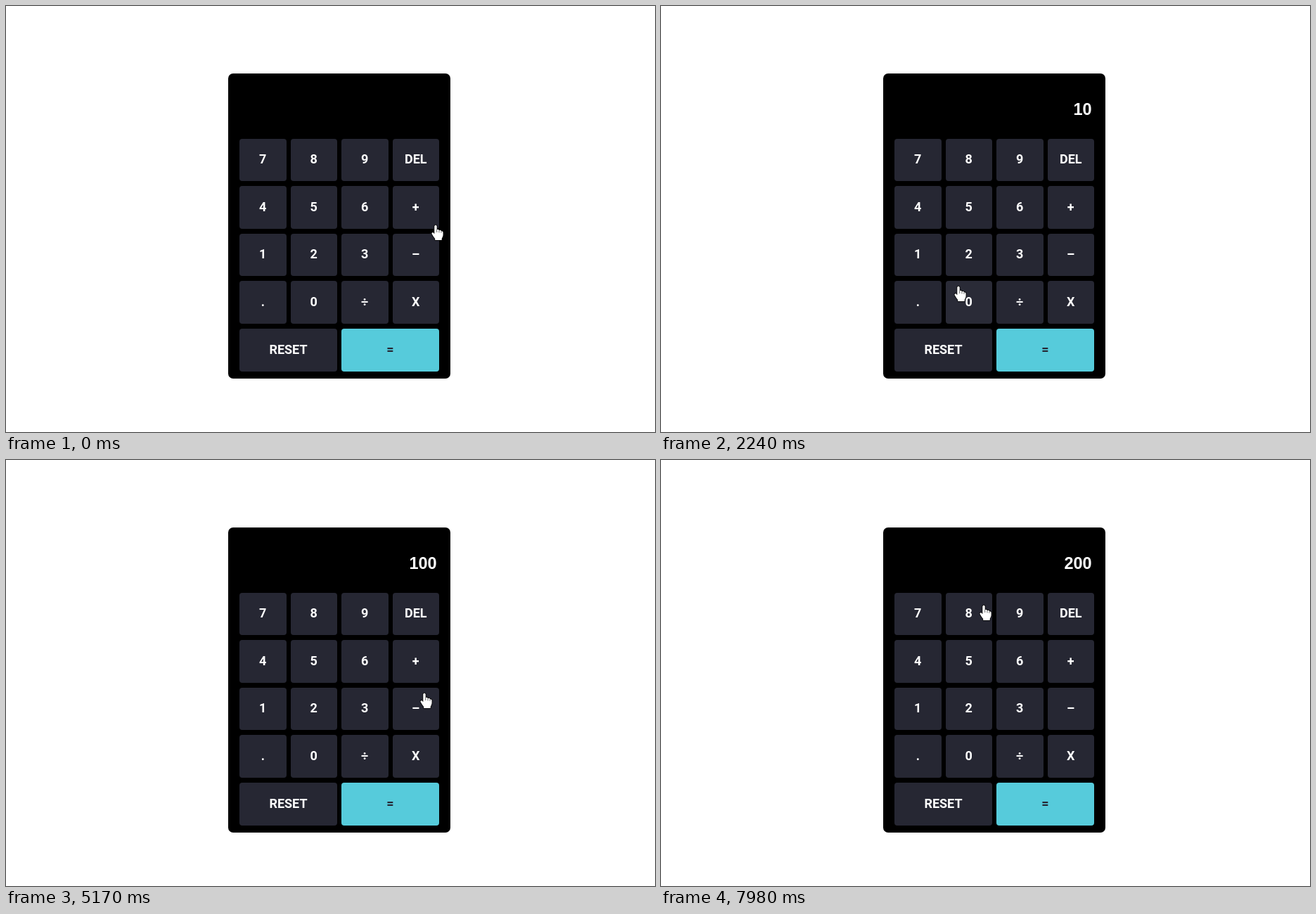
Write an HTML page that moves like this. It is 923x606 px and loops after 8000 ms.

```html
<!DOCTYPE html>
<html lang="en">
<head>
<meta charset="utf-8">
<title>Calculator</title>
<style>
  html, body { margin: 0; width: 100%; height: 100%; overflow: hidden; background: #fff; }
  svg { display: block; width: 923px; height: 606px; }
  .key { font: 700 18px Roboto, sans-serif; text-anchor: middle; fill: #fff; }
  .display { font: 700 23.5px "Liberation Sans", Arial, sans-serif; text-anchor: end; fill: #fff; }
</style>
</head>
<body>
<svg viewBox="0 0 923 606">
  <rect x="316" y="96" width="316" height="434" rx="7"/>
  <g id="keys"></g>
  <text id="display" class="display" x="612.6" y="155"></text>
  <g id="ripples"></g>
  <g id="cursor">
    <g id="hand" stroke="#000" stroke-linejoin="round">
      <path fill="#fff" stroke-width="1.6" paint-order="stroke"
        d="M-1.7 2Q0-1 1.7 2V7Q4.5 6 5 8.2Q7.4 7.2 8 9.2Q10.6 8.8 10.6 11V15Q10.4 17 8.7 20V22H-.8V20Q-3.4 17-5.2 13.6C-6.3 11.6-4.5 10.5-3.2 11.6L-1.7 13.2Z"/>
      <path fill="none" stroke-width=".6" d="M1.7 7V11M5 8.2V11.4M8 9.2V11.8"/>
    </g>
    <path id="arrow" fill="#fff" stroke="#222"
      d="M.5.5V16L4.1 12.7L6.7 18.5L9.1 17.4L6.6 11.8L11 11.5Z"/>
  </g>
</svg>
<script>
const LOOP = 8000, FIRST_STEP = 130, STEP = 70, RIPPLE_MS = 600;
const $ = id => document.getElementById(id);

function add(parent, tag, attrs, text = "") {
  const node = document.createElementNS("http://www.w3.org/2000/svg", tag);
  for (const name in attrs) node.setAttribute(name, attrs[name]);
  node.textContent = text;
  return parent.appendChild(node);
}

// Boxes are snapped to whole pixels, as a browser does for a layout grid.
function snap(left, top, width, height) {
  const x = Math.round(left), y = Math.round(top);
  return { x, y, width: Math.round(left + width) - x, height: Math.round(top + height) - y };
}

const rows = ["7 8 9 DEL", "4 5 6 +", "1 2 3 –", ". 0 ÷ X", "RESET ="].map(r => r.split(" "));
const keys = rows.flatMap((labels, row) => labels.map((label, col) => {
  const pitch = 290 / labels.length, top = 188.6 + row * 67.6;
  const box = snap(332 + col * pitch, top, pitch - 6, 60.6);
  const equals = label === "=";
  add($("keys"), "rect", { ...box, rx: 4, fill: equals ? "#56cbdb" : "#262733" });
  add($("keys"), "text", {
    class: "key", x: 332 + col * pitch + (pitch - 6) / 2, y: Math.floor(top + 36),
    style: equals ? "fill:#262733" : ""
  }, label);
  return { label, box };
}));

const keyAt = ({ x, y }) => keys.find(({ box }) =>
  x >= box.x && x <= box.x + box.width && y >= box.y && y <= box.y + box.height);

// Pointer key points: time, x, y and an optional rest in ms.
const path = [
  [0, 611, 311, 90], [600, 405, 420], [860, 341, 380], [1230, 366, 344, 120],
  [1460, 383, 375], [1740, 428, 402, 130], [2300, 423, 398, 300], [2660, 431, 408, 80],
  [3070, 527, 352], [3780, 600, 287], [4060, 607, 383], [4330, 604, 346],
  [4550, 589, 303, 150], [4960, 597, 266], [5480, 590, 417, 260], [5870, 563, 405],
  [6300, 452, 359, 125], [6640, 582, 544, 60], [7080, 552, 490, 250], [7740, 455, 325],
  [7970, 459, 206, 30]
].map(([time, x, y, rest = 0]) => ({ time, x, y, rest, end: time + rest }));

function slope(i, axis) {
  const prev = path[i - 1], next = path[i + 1];
  return path[i].rest ? 0 : (next[axis] - prev[axis]) / (next.time - prev.end);
}

function pointer(t) {
  const i = path.findLastIndex(p => p.time <= t), a = path[i], b = path[i + 1];
  if (t <= a.end || !b) return { x: a.x, y: a.y };
  const span = b.time - a.end, u = (t - a.end) / span, ease = u * u * (3 - 2 * u);
  const along = axis => Math.round(a[axis] + (b[axis] - a[axis]) * ease +
    span * u * (1 - u) * (slope(i, axis) * (1 - u) - slope(i + 1, axis) * u));
  return { x: along("x"), y: along("y") };
}

function enter(text, label) {
  if (label === "=") return String(text.split("*").reduce((a, b) => a * b));
  return text + (label === "X" ? "*" : label);
}

// Each press hits the key under the pointer and starts a ripple there.
let entered = "";
const presses = [1350, 1790, 2735, 5740, 6425, 7330].map((time, i) => {
  const at = pointer(time), { label, box } = keyAt(at);
  add(add($("ripples"), "clipPath", { id: "clip" + i }), "rect", { ...box, rx: 4 });
  const group = add($("ripples"), "g", { "clip-path": `url(#clip${i})` });
  const circle = add(group, "circle", { cx: at.x, cy: at.y, fill: "#fff" });
  entered = enter(entered, label);
  return { time, circle, size: box.width, value: entered };
});

function draw(t) {
  let value = "";
  for (const press of presses) {
    const u = (t - press.time) / RIPPLE_MS;
    const active = u >= 0 && u < 1;
    if (u >= 0) value = press.value;
    press.circle.setAttribute("r", active ? press.size * 2 * u : 0);
    press.circle.setAttribute("opacity", active ? 0.26 * (1 - u) ** 2 : 0);
  }
  $("display").textContent = value;

  const at = pointer(t), overKey = keyAt(at);
  $("cursor").setAttribute("transform", `translate(${at.x} ${at.y})`);
  $("hand").style.display = overKey ? "" : "none";
  $("arrow").style.display = overKey ? "none" : "";
}

const stepped = t =>
  t < FIRST_STEP ? 0 : FIRST_STEP + Math.floor((t - FIRST_STEP) / STEP) * STEP;

const begin = performance.now();
function tick() {
  draw(stepped((performance.now() - begin) % LOOP));
  requestAnimationFrame(tick);
}
tick();
</script>
</body>
</html>
```
